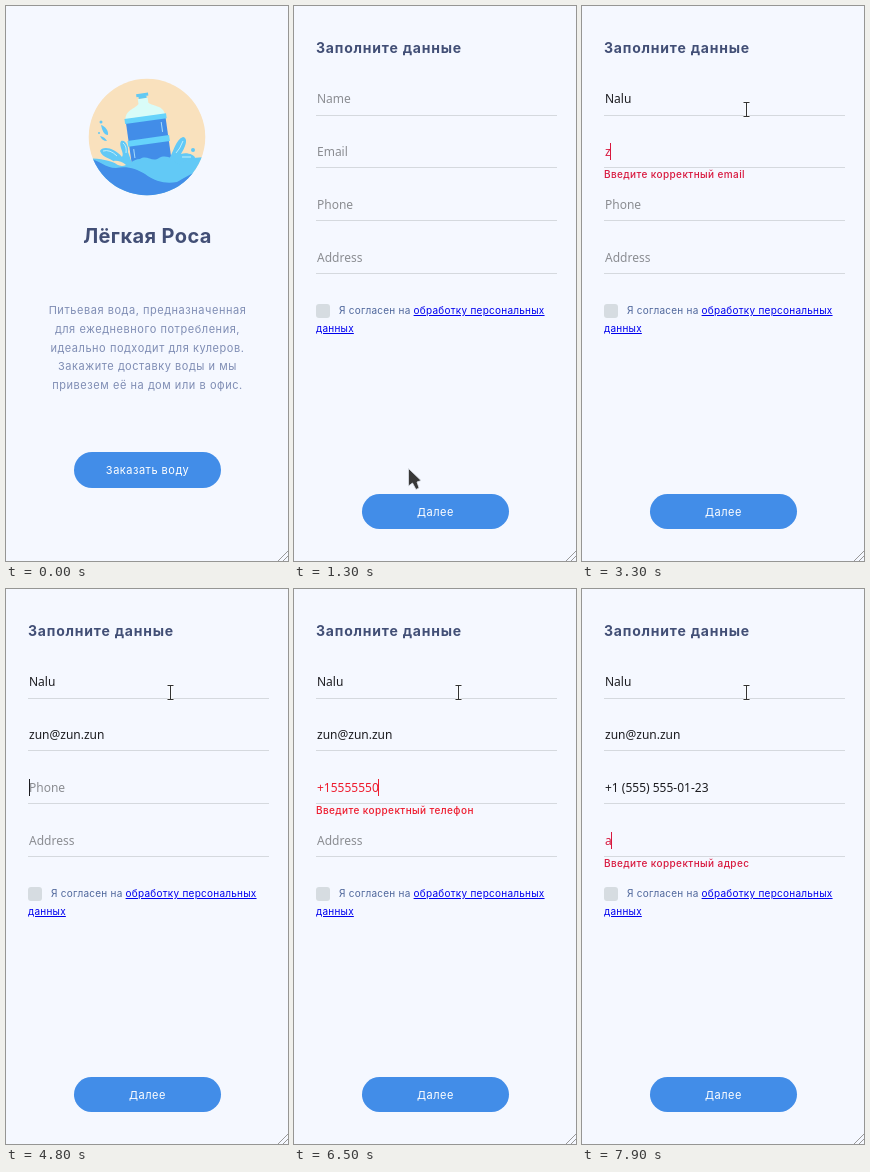
An HTML page that plays this animation: 282x555 px, repeating every 8000 ms.

```html
<!DOCTYPE html>
<html lang="ru">
<head>
<meta charset="utf-8">
<title>Заказ воды</title>
<style>
  html, body { margin: 0; width: 100%; height: 100%; overflow: hidden; background: #f5f8ff; }
  svg { display: block; width: 100%; height: 100%; }
  text { font-family: Inter, "Open Sans", sans-serif; white-space: pre; }
  .title { font-weight: 700; font-size: 20px; letter-spacing: .4px; fill: #424f76; }
  .heading { font-weight: 700; font-size: 14px; letter-spacing: .8px; fill: #424f76; }
  .copy { font-size: 11px; letter-spacing: .55px; fill: #7f8db4; }
  .label { font-size: 11px; letter-spacing: .5px; fill: #fff; }
  .consent { font-size: 10px; letter-spacing: .25px; fill: #4f679c; }
  .link { fill: #00e; text-decoration: underline; text-underline-offset: 2px; text-decoration-skip-ink: none; }
  .hint { font-size: 10px; font-weight: 500; letter-spacing: .4px; }
  .value { font-family: "Noto Sans", "Open Sans", sans-serif; font-size: 12px; }
  .center { text-anchor: middle; }
</style>
</head>
<body>
<svg viewBox="0 0 282 555">
  <defs>
    <clipPath id="disc"><circle cx="141" cy="131" r="58.3"/></clipPath>
    <clipPath id="pill"><rect x="68" y="446" width="147" height="36" rx="18"/></clipPath>
  </defs>
  <rect width="282" height="555" fill="#f5f8ff"/>

  <g id="intro">
    <g clip-path="url(#disc)">
      <circle cx="141" cy="131" r="59" fill="#f9e1bd"/>
      <g transform="translate(142 130) rotate(-8)">
        <path d="M-5 -38H5V-33C8 -29 20 -29 20 -18H-20C-20 -29 -8 -29 -5 -33Z" fill="#d9fcf8"/>
        <path d="M-6 -43H6V-40H-6Z M-4 -40H4V-38H-4Z" fill="#62c9f3"/>
        <rect x="-20" y="-19" width="40" height="45" fill="#428de8"/>
        <path d="M-21 -20H21V-15H-21Z M-21 2H21V8H-21Z" fill="#66d3fb"/>
        <path d="M15 -12V-2M-16 11V20" stroke="#a9dcfb"/>
      </g>
      <g fill="#62c9f6">
        <path d="M80 153C96 151 104 156 116 159C124 159 127 153 134 153C141 148 146 157 153 152C160 148 166 153 175 156C184 150 191 153 202 150V192H80Z"/>
        <path d="M94 145C96 140 108 141 116 151C119 147 112 140 115 135C119 133 123 140 122 146L127 160L112 159C106 152 96 152 94 145Z"/>
        <path d="M163 153C167 147 170 133 177 131C183 132 179 142 175 148C181 146 189 149 189 152C184 154 178 154 174 159Z"/>
        <path d="M95 119C99 120 103 125 102 129C98 129 96 124 95 119ZM94 130Q99 131 101 135Q96 135 94 130Z"/>
        <circle cx="95" cy="116" r="1.5"/><circle cx="93" cy="127" r="1"/>
        <circle cx="187" cy="144" r="2"/>
      </g>
      <path d="M97 145Q104 143 111 150M117 137Q121 140 120 147M177 135Q174 143 170 147M176 151L185 151"
            fill="none" stroke="#d9f8fc" stroke-width=".8"/>
      <path d="M107 155Q114 154 120 159Q113 162 107 155Z" fill="#f9e1bd"/>
      <path d="M80 152C92 153 99 162 110 162C122 160 130 163 139 168C150 176 160 178 171 176C181 170 190 165 202 161V192H80Z" fill="#428de8"/>
    </g>
    <text class="title center" x="141.5" y="237">Лёгкая Роса</text>
    <g id="copy"></g>
    <rect x="68" y="446" width="147" height="36" rx="18" fill="#428de8"/>
    <g id="pressed">
      <g clip-path="url(#pill)">
        <rect x="68" y="446" width="147" height="36" fill="#2f66ac"/>
        <rect x="69" y="448" width="148" height="37" rx="18" fill="#428de8"/>
      </g>
      <rect x="97.5" y="446.5" width="88" height="35" fill="none" stroke="#fff"
            stroke-dasharray="1 1" stroke-dashoffset=".5"/>
    </g>
    <text class="label center" x="141.5" y="468">Заказать воду</text>
  </g>

  <g id="form">
    <text class="heading" x="22" y="47">Заполните данные</text>
    <g id="fields"></g>
    <rect x="22" y="298" width="14" height="14" rx="3" fill="#d6dce1"/>
    <text class="consent" x="45" y="308">Я согласен на <tspan class="link">обработку персональных</tspan></text>
    <text class="consent link" x="22" y="326">данных</text>
    <rect x="68" y="488" width="147" height="35" rx="17.5" fill="#428de8"/>
    <text class="label center" x="141.5" y="510">Далее</text>
  </g>

  <path d="M272 555L282 545M277 555L282 550" stroke="#999"/>
  <path id="arrow" d="M.5 .5V18L4.5 15L8 21.5L11 20L9 14L13 12.5Z" fill="#383838" stroke="#dde3ea" stroke-width=".8"/>
  <g id="beam" fill="none">
    <path d="M-3 -7H3M0 -7V7M-3 7H3" stroke="#fff" stroke-width="2.5" opacity=".7"/>
    <path d="M-3 -7H3M0 -7V7M-3 7H3" stroke="#333"/>
  </g>
</svg>
<script>
const LOOP = 8000, STEP = 100;
const $ = id => document.getElementById(id);
const show = (node, on) => node.style.display = on ? '' : 'none';

function add(parent, tag, attrs, content = '') {
  const node = document.createElementNS('http://www.w3.org/2000/svg', tag);
  for (const key in attrs) node.setAttribute(key, attrs[key]);
  node.textContent = content;
  return parent.appendChild(node);
}

['Питьевая вода, предназначенная', 'для ежедневного потребления,', 'идеально подходит для кулеров.',
 'Закажите доставку воды и мы', 'привезем её на дом или в офис.']
  .forEach((line, i) => add($('copy'), 'text', { class: 'copy center', x: 141.5, y: 308 + 18.75 * i }, line));

// Key strokes are [time, number of characters]; a run adds one per step.
const run = (start, length, count) => Array.from({ length: count }, (_, i) => [start + STEP * i, length + i]);

const fields = [
  { label: 'Name', text: 'Nalu', hint: 'Введите корректное имя', red: '#d8193f',
    focus: [2200, 3100], validAt: 2700, keys: [[2400, 1], [2700, 3], [2900, 4]] },
  { label: 'Email', text: 'zun@zun.zun', hint: 'Введите корректный email', red: '#d8193f',
    focus: [3100, 4800], validAt: 4500, keys: [[3300, 1], [3500, 3], [3800, 4], ...run(4000, 5, 7)] },
  { label: 'Phone', text: '+15555550123', hint: 'Введите корректный телефон', red: '#ee1c2e',
    focus: [4800, 7200], validAt: 6700, keys: [[5500, 1], [5600, 2], ...run(5900, 3, 9)],
    formatted: '+1 (555) 555-01-23', formatAt: 6900 },
  { label: 'Address', text: 'a', hint: 'Введите корректный адрес', red: '#d8193f',
    focus: [7400, LOOP], validAt: LOOP, keys: [[7900, 1]] }
];

fields.forEach((field, i) => {
  const box = $('fields'), top = 84 + 53 * i;
  add(box, 'rect', { x: 22, y: Math.floor(109 + 52.7 * i), width: 241, height: 1, fill: '#d5d9de' });
  field.value = add(box, 'text', { class: 'value', x: 23, y: top + 13 });
  field.error = add(box, 'text', { class: 'hint', x: 22, y: top + 35, fill: field.red }, field.hint);
  field.caret = add(box, 'rect', { y: top, width: 1, height: 17 });
});

function drawField(field, t) {
  const { value, error, caret, focus } = field;
  const length = field.keys.reduce((n, [time, count]) => t >= time ? count : n, 0);
  const typed = t >= field.formatAt ? field.formatted : field.text.slice(0, length);
  const invalid = length > 0 && t < field.validAt;
  const color = invalid ? field.red : '#1c1c20';
  value.textContent = typed || field.label;
  value.setAttribute('fill', typed ? color : '#8b8d92');
  show(error, invalid);
  show(caret, t >= focus[0] && t < focus[1]);
  caret.setAttribute('x', Math.floor(23 + (typed ? value.getComputedTextLength() : 0)));
  caret.setAttribute('fill', color);
}

const progress = (t, start, end) => Math.min(1, Math.max(0, (t - start) / (end - start)));
const easeInOut = p => p * p * (3 - 2 * p);
const bezier = (a, b, c, p) => (1 - p) ** 2 * a + 2 * p * (1 - p) * b + p * p * c;

function pointerAt(t) {
  if (t >= 2100) return [164.5, 103.5];
  if (t >= 1400) {
    const p = easeInOut(progress(t, 1400, 1900));
    return [bezier(114, 102, 143.5, p), bezier(462, 300, 94.5, p)];
  }
  const p = 1 - (1 - progress(t, 600, 1000)) ** 2;
  return [46 + 68 * p, 394 + 68 * p];
}

function draw(t) {
  const onForm = t >= 1300;
  show($('intro'), !onForm);
  show($('form'), onForm);
  show($('pressed'), t >= 1200);
  if (onForm) fields.forEach(field => drawField(field, t));

  const [x, y] = pointerAt(t), overInput = onForm && y < 110;
  show($('arrow'), t >= 600 && !overInput);
  show($('beam'), overInput);
  $(overInput ? 'beam' : 'arrow').setAttribute('transform', `translate(${x} ${y})`);
}

const start = performance.now();
function frame() {
  const t = (performance.now() - start) % LOOP;
  draw(Math.floor(t / STEP) * STEP);
  requestAnimationFrame(frame);
}
frame();
</script>
</body>
</html>
```
